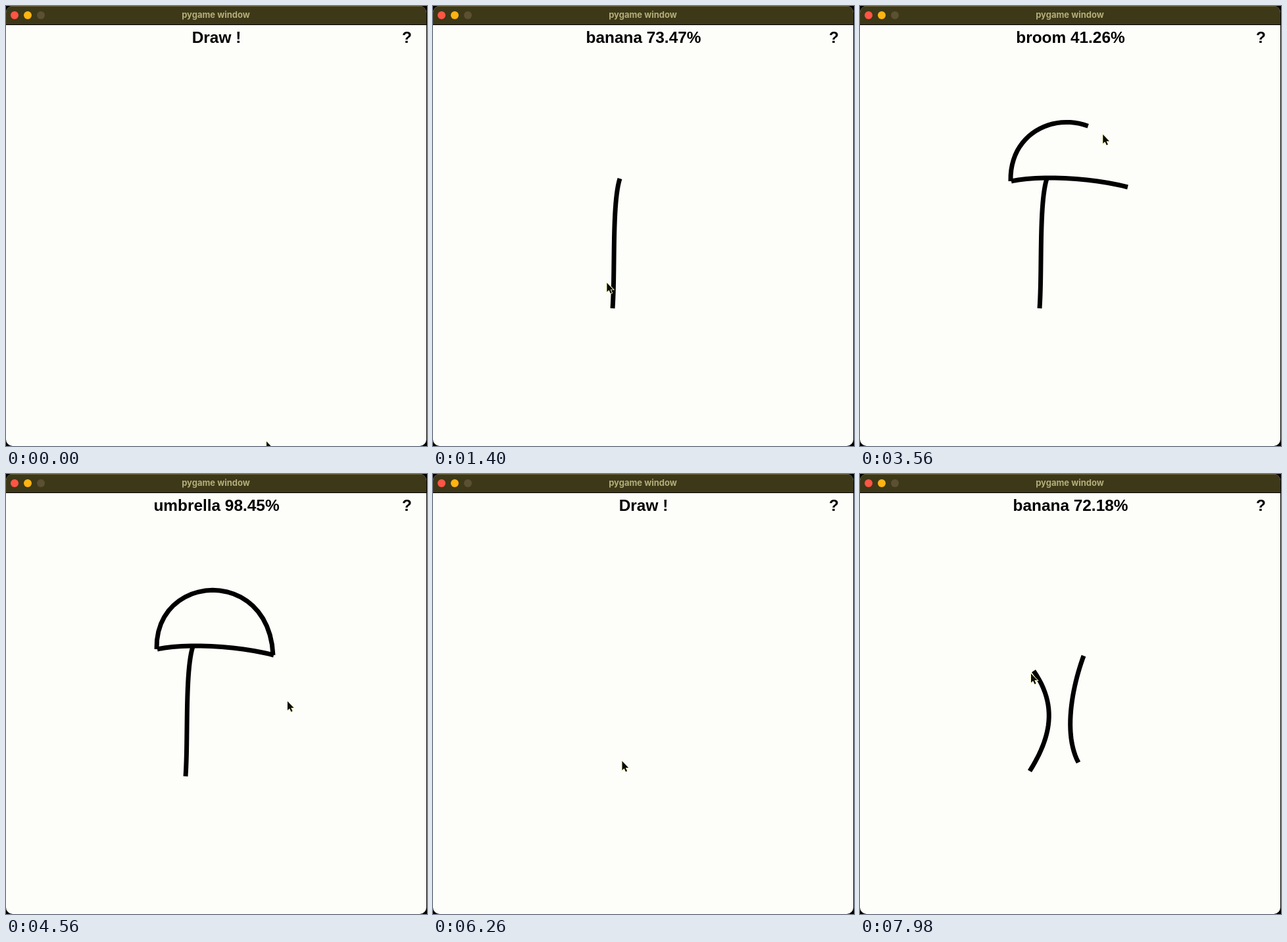
Recreate the animation shown at these times as an HTML page with a canvas. Size 640 by 668 pixels, loop 8000 ms.

```html
<!DOCTYPE html>
<html lang="en">
<head>
<meta charset="utf-8">
<title>pygame window</title>
<style>
  html, body { margin: 0; width: 100%; height: 100%; overflow: hidden; background: #000; }
  canvas { display: block; }
</style>
</head>
<body>
<canvas id="stage" width="640" height="668"></canvas>
<script>
const ctx = document.getElementById('stage').getContext('2d');
const LOOP = 8000;
const CLEAR = 4980;       // the sheet is wiped
const INK_LAG = 70;       // the ink trails the mouse
const GUESS_DELAY = 130;  // a guess follows each stroke
const TRAVEL = 560;       // usual move from one stroke to the next

// Mouse itinerary: strokes are cubic Béziers, single points are stops.
const steps = [
  { start: 0, end: 20, path: [[396, 661]] },
  { start: 860, end: 1240, travel: 720, guess: 'banana 73.47%',
    path: [[284, 262], [272, 300], [277, 400], [273, 459]] },
  { start: 1972, end: 2452, guess: 'broom 41.26%',
    path: [[230, 266], [270, 257], [350, 260], [407, 275]] },
  { start: 3033, end: 3765, guess: 'umbrella 98.45%',
    path: [[229, 266], [226, 150], [400, 140], [406, 275]] },
  { start: 4940, end: 5640, travel: 1100, path: [[433, 361]] },
  { start: 6480, end: 6880, travel: 840, guess: 'banana 72.18%',
    path: [[258, 451], [290, 400], [301, 352], [264, 299]] },
  { start: 7200, end: 7600, path: [[340, 276], [322, 325], [309, 395], [332, 438]] },
  { start: 7960, end: LOOP, path: [[260, 303]] }
];
const strokes = steps.filter(s => s.path.length > 1);

const clamp = v => Math.max(0, Math.min(1, v));
const smooth = v => v * v * (3 - 2 * v);
const mix = (a, b, v) => a.map((n, i) => n + (b[i] - n) * v);
const progress = (s, t) => clamp((t - s.start) / (s.end - s.start));

// De Casteljau: repeated mixing gives the point at v.
function pointOn(path, v) {
  while (path.length > 1) path = path.slice(1).map((p, i) => mix(path[i], p, v));
  return path[0];
}

function mouseAt(t) {
  const i = steps.findLastIndex(s => s.start <= t);
  const step = steps[i], next = steps[i + 1];
  if (t < step.end || !next) return pointOn(step.path, progress(step, t));
  const time = Math.min(next.travel || TRAVEL, next.start - step.end);
  return mix(step.path.at(-1), next.path[0], smooth(clamp((t - step.end) / time)));
}

function guessAt(t) {
  const from = t < CLEAR ? 0 : CLEAR;
  const last = steps.findLast(s => s.guess && s.start >= from && s.end + GUESS_DELAY <= t);
  return last ? last.guess : 'Draw !';
}

function trace(points) {
  ctx.beginPath();
  points.forEach(([x, y]) => ctx.lineTo(x, y));
}

function rect(color, y, height) {
  ctx.fillStyle = color;
  ctx.fillRect(0, y, 640, height);
}

function label(text, x, y, font, color) {
  ctx.font = font;
  ctx.fillStyle = color;
  ctx.textAlign = 'center';
  ctx.fillText(text, x, y);
}

function drawWindow() {
  rect('#000', 0, 668);
  ctx.save();
  ctx.beginPath();
  ctx.roundRect(0, 0, 639, 668, 10);
  ctx.clip();
  rect('#fdfdfa', 0, 668);
  rect('#3d3818', 0, 28);
  rect('#66623a', 0, 1);
  rect('#000', 28, 1);
  ctx.restore();
  ['#ff5545', '#ffb412', '#5c5032'].forEach((color, i) => {
    ctx.fillStyle = color;
    ctx.beginPath();
    ctx.arc(13 + 20 * i, 14, 6, 0, 7);
    ctx.fill();
  });
  label('pygame window', 319, 18, 'bold 13px Inter, sans-serif', '#b3ae78');
}

function drawStroke(stroke, t) {
  const v = progress(stroke, t - INK_LAG);
  if (!v || (stroke.end < CLEAR && t >= CLEAR)) return;
  const count = 24;
  trace(Array.from({ length: count + 1 }, (_, i) => pointOn(stroke.path, v * i / count)));
  ctx.strokeStyle = '#000';
  ctx.lineWidth = 7;
  ctx.stroke();
}

function drawMouse([x, y]) {
  ctx.save();
  ctx.translate(x, y);
  ctx.scale(0.92, 0.92);
  trace([[0, 0], [0, 15], [3.4, 12], [6, 17.5], [8.3, 16.5], [5.8, 11], [10.5, 11]]);
  ctx.closePath();
  ctx.strokeStyle = '#ffffd0';
  ctx.lineWidth = 2;
  ctx.stroke();
  ctx.fillStyle = '#0c0c00';
  ctx.fill();
  ctx.restore();
}

function draw(t) {
  drawWindow();
  const font = 'bold 24.4px "Liberation Sans", Arial, sans-serif';
  label(guessAt(t), 320, 56, font, '#000');
  label('?', 609.5, 56, font, '#000');
  strokes.forEach(s => drawStroke(s, t));
  drawMouse(mouseAt(t));
}

const began = performance.now();
function tick() {
  draw((performance.now() - began) % LOOP);
  requestAnimationFrame(tick);
}
tick();
</script>
</body>
</html>
```
